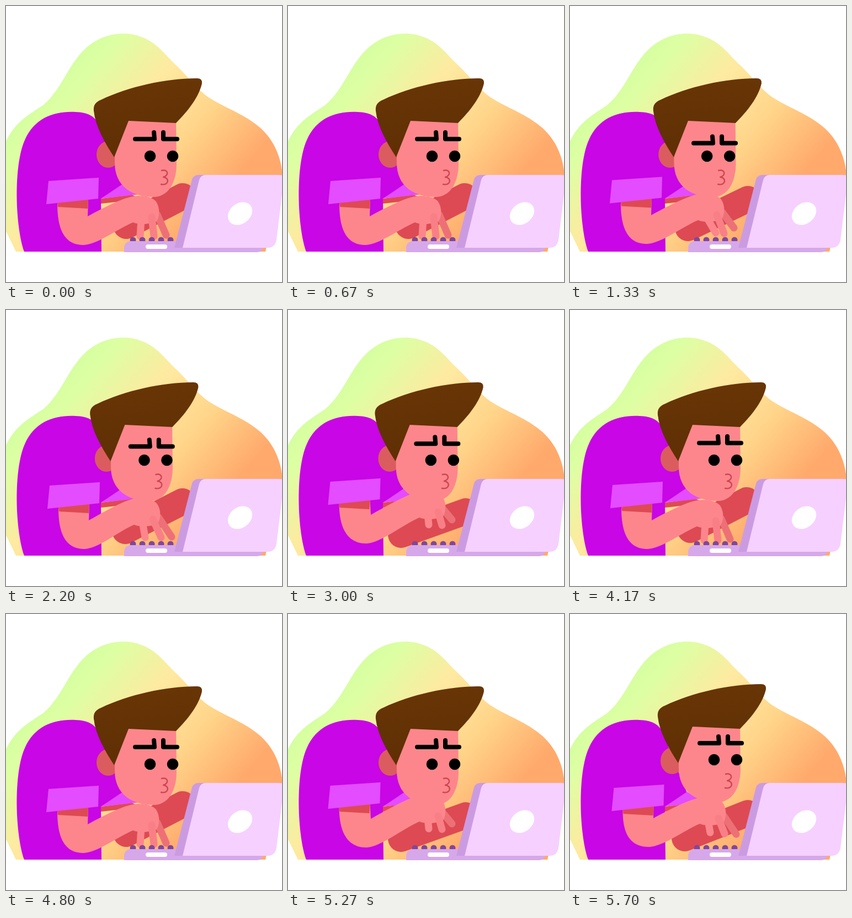
These frames come from a looping animation (500 px wide and 500 px high, 5.73 s). An HTML page with a canvas:

```html
<!DOCTYPE html>
<html lang="en">
<head>
<meta charset="utf-8">
<title>Typing</title>
<style>
html, body { margin: 0; width: 100%; height: 100%; overflow: hidden; background: #fff; }
canvas { display: block; width: 500px; height: 500px; }
</style>
</head>
<body>
<canvas id="c" width="500" height="500"></canvas>
<script>
const ctx = document.getElementById('c').getContext('2d');
const LOOP = 5730, CYCLE = 4800, BEAT = 320;
const SKIN = '#fd868c', SHADE = '#dd4a53', PURPLE = '#c806e6', LILAC = '#e44cff';

// Keys of the typing beat, in eighths
const KEYS = [0, 1, 3, 6, 7];
const T = {
  sleeve: [[0, 0], [-1, -1.5], [-.5, -6], [2.5, -2], [2, 1]],
  elbow: [[0, 0], [-1, -2], [2, -10], [3, -11], [2, 0]],
  wrist: [[0, 0], [2, -4], [8, -16], [5, -12], [2, -3]],
  farElbow: [[218, 398], [214, 402], [205, 407], [208, 406], [216, 400]],
  farHand: [[320, 345], [322, 350], [322, 365], [322, 361], [320, 347]],
  tipA: [[243, 417], [264, 411], [255, 389], [254, 396], [252, 412]],
  tipB: [[268, 417], [279, 412], [279, 390], [280, 398], [281, 412]],
  tipC: [[290, 415], [297, 402], [297, 380], [301, 399], [300, 411]]
};

// Smooth periodic curve through the five keys
function track(name, u) {
  const pts = T[name], n = KEYS.length;
  const key = k => KEYS[((k % n) + n) % n] + 8 * Math.floor(k / n);
  const pt = (k, a) => pts[((k % n) + n) % n][a];
  let i = n - 1;
  while (KEYS[i] > u) i--;
  const h = key(i + 1) - key(i), s = (u - key(i)) / h;
  return [0, 1].map(a => {
    const m = k => (pt(k + 1, a) - pt(k - 1, a)) / (key(k + 1) - key(k - 1)) * h;
    const p = pt(i, a), q = pt(i + 1, a);
    return p + s * m(i) + s * s * (3 * (q - p) - 2 * m(i) - m(i + 1)) +
      s * s * s * (2 * (p - q) + m(i) + m(i + 1));
  });
}

function ramp(t, a, b) {
  const x = Math.min(1, Math.max(0, (t - a) / (b - a)));
  return x * x * (3 - 2 * x);
}
const pulse = (t, a, b, d) => ramp(t, a, a + d) - ramp(t, b, b + d);

function fill(d, color) {
  ctx.fillStyle = color;
  ctx.fill(new Path2D(d));
}
function stroke(d, color, w) {
  ctx.strokeStyle = color;
  ctx.lineWidth = w;
  ctx.lineCap = ctx.lineJoin = 'round';
  ctx.stroke(new Path2D(d));
}
function oval(x, y, rx, ry, color, rot = 0) {
  ctx.fillStyle = color;
  ctx.beginPath();
  ctx.ellipse(x, y, rx, ry, rot, 0, 7);
  ctx.fill();
}
function shifted(x, y, draw) {
  ctx.save();
  ctx.translate(x, y);
  draw();
  ctx.restore();
}
function blend(x0, y0, x1, y1, stops) {
  const g = ctx.createLinearGradient(x0, y0, x1, y1);
  stops.forEach(([at, color]) => g.addColorStop(at, color));
  return g;
}

const sky = blend(112, 99, 390, 343,
  [[0, '#d3ff9f'], [.12, '#ddffa3'], [.4, '#ffe9a0'], [.68, '#ffd58a'], [1, '#ffa96c']]);
const brown = blend(240, 135, 250, 275, [[0, '#693506'], [.5, '#633205'], [1, '#5f2f04']]);

function backdrop() {
  fill('M18 445L0 408V245C18 207 46 195 68 179C100 152 112 108 142 79C168 54 201 46 232 52' +
    'C272 61 287 88 308 107C335 133 347 153 371 168C402 187 432 196 461 221' +
    'C485 243 496 270 500 297V310L470 445Z', sky);
}

function farArm(u) {
  const e = track('farElbow', u), h = track('farHand', u);
  fill('M172 349L228 342L245 350L172 358Z', SHADE);
  stroke(`M${e}L${h}`, SHADE, 48);
}

function body() {
  fill('M33 445C17 400 13 290 34 243C52 202 88 190 126 192C148 193 161 199 168 215' +
    'L212 324L172 349L173 445Z', PURPLE);
  fill('M172 349L212 322L243 341Z', LILAC);
}

function brow() {
  stroke('M234 241H269L268 229M310 241H285V229', '#000', 8);
}

function head(turn, lift) {
  shifted(-8 * turn, -3 * lift, () => oval(185, 269, 21, 24, '#db5c5e'));
  shifted(-18 * turn, -5 * lift, () =>
    fill('M222 200H308L309 288C308 323 292 346 267 346C229 346 197 327 197 284V262Z', SKIN));
  shifted(-17 * turn, -4 * lift, () =>
    fill('M196 274C178 246 162 218 159 190C158 180 162 174 172 170C222 146 290 131 346 131' +
      'Q356 131 355 140C350 164 330 190 308 212L222 208Z', brown));
  shifted(-27 * turn, -8 * lift, () => {
    oval(261, 272, 10.3, 10.3, '#000');
    oval(302, 272, 10.3, 10.3, '#000');
    stroke('M282 298C295 295 295 308 285 310C297 311 295 326 281 323', '#cc4652', 2.4);
  });
  shifted(-21 * turn + lift, 16 * turn - 7 * lift, brow);
}

function nearArm(u) {
  const s = track('sleeve', u), e = track('elbow', u), w = track('wrist', u);
  const at = (o, x, y) => `${x + o[0]} ${y + o[1]} `;
  const finger = (name, x, y, color, width) =>
    stroke(`M${at(w, x, y)}L${track(name, u)}`, color, width);

  finger('tipC', 274, 378, '#ed7077', 13);
  fill('M' + at(s, 93, 350) + 'C' + at(s, 93, 375) + at(e, 92, 433) + at(e, 140, 433) +
    'C' + at(e, 166, 432) + at(w, 200, 405) + at(w, 230, 392) +
    'C' + at(w, 245, 398) + at(w, 265, 394) + at(w, 273, 390) +
    'C' + at(w, 280, 378) + at(w, 278, 362) + at(w, 271, 353) +
    'C' + at(w, 260, 343) + at(w, 242, 343) + at(w, 230, 345) +
    'C' + at(w, 210, 348) + at(e, 172, 368) + at(e, 148, 381) +
    'L' + at(s, 149, 350) + 'Z', SKIN);
  finger('tipA', 245, 386, SKIN, 13);
  finger('tipB', 264, 382, '#f97f86', 13);

  shifted(s[0], s[1], () => {
    fill('M93 356L149 350L148 367L94 364Z', SHADE);
    fill('M77 317L168 311L167 349L73 359Z', LILAC);
  });
}

function laptop() {
  for (let i = 0; i < 5; i++) oval(230 + 17 * i, 424, 5.5, 5.5, '#80479a');
  fill('M214 445V438Q215 426 227 426H466V437Q464 446 455 446H214Z', '#d6a8ea');
  fill('M305 438L337 314Q340 306 349 306H372L340 438Z', '#cb9be2');
  stroke('M257 436H288', '#fff', 8);
  fill('M320 438L350 315Q353 306 362 306H496Q505 306 503 316L490 424Q487 438 474 438Z', '#f6d0ff');
  oval(424, 376, 24, 18.5, '#fff', -.65);
}

// Five poses are shown in each 200 ms, the first one held longer
function poseTime(t) {
  const r = t % 200;
  const step = [70, 100, 130, 170].filter(x => r >= x).length;
  return t - r + step * 40;
}

function draw(now) {
  const t = poseTime(now % LOOP), c = t % CYCLE;
  const u = (t % BEAT) / BEAT * 8;
  const turn = pulse(c, 1175, 2028, 300) + pulse(c, 2948, 3801, 300);
  const lift = pulse(c, 640, 960, 160);

  ctx.fillStyle = '#fff';
  ctx.fillRect(0, 0, 500, 500);
  backdrop();
  farArm(u);
  body();
  head(turn, lift);
  nearArm(u);
  laptop();
}

const start = performance.now();
function tick() {
  draw(performance.now() - start);
  requestAnimationFrame(tick);
}
tick();
</script>
</body>
</html>
```
